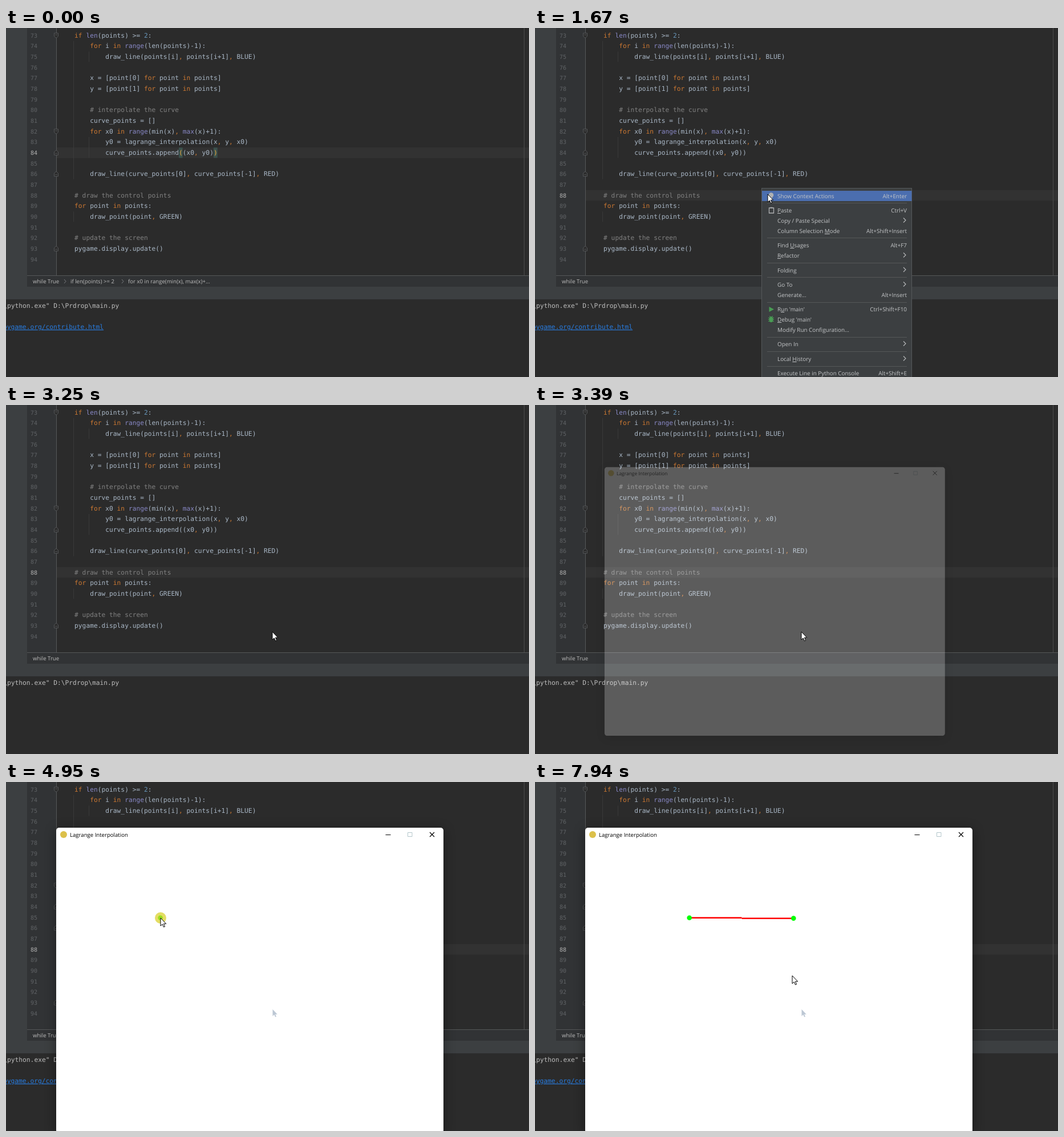
An HTML page that plays this animation: 917x611 px, repeating every 8 s.

```html
<!DOCTYPE html>
<html lang="en">
<head>
<meta charset="utf-8">
<title>Editor run</title>
<style>
html, body { margin: 0; width: 100%; height: 100%; overflow: hidden; background: #2b2b2b; }
svg { display: block; }
text { white-space: pre; text-rendering: geometricPrecision; text-decoration-skip-ink: none; font: 9.6px "Open Sans", "Noto Sans", sans-serif; }
.mono text { font: 11.25px "DejaVu Sans Mono", "Noto Sans Mono", monospace; }
.mono .num { font-size: 10px; }
#menu text { font-size: 9.9px; }
#win { filter: drop-shadow(0 4px 10px rgba(0, 0, 0, .4)); }
</style>
</head>
<body>
<svg id="stage" width="917" height="611" viewBox="0 0 917 611">
  <g id="base"></g>
  <g id="code" class="mono"></g>
  <g id="menu"></g>
  <g id="win"></g>
  <circle id="click" r="10" fill="#d9d028" opacity=".72"/>
  <path id="cursor" fill="#fff" stroke="#000" stroke-linejoin="round"/>
</svg>
<script>
const LOOP = 8000, CHAR = 6.773, ROW = 18.667;
const $ = id => document.getElementById(id);
const base = $('base'), code = $('code'), menu = $('menu'), win = $('win');
const ARROW = 'M0 0V14L3.2 11L5.5 16L7.6 15.1L5.4 10.2H9.7Z';

function add(parent, tag, attrs, text) {
  const el = document.createElementNS('http://www.w3.org/2000/svg', tag);
  for (const k in attrs) el.setAttribute(k, attrs[k]);
  if (text !== undefined) el.textContent = text;
  parent.append(el);
  return el;
}
const rect = (p, x, y, width, height, fill) => add(p, 'rect', { x, y, width, height, fill });
const line = (p, d, stroke, w = 1) => add(p, 'path', { d, stroke, fill: 'none', 'stroke-width': w });
const label = (p, x, y, s, fill, more) => add(p, 'text', { x, y, fill, ...more }, s);
const show = (el, on) => el.setAttribute('visibility', on ? 'visible' : 'hidden');
const rowY = n => 13 + (n - 73) * ROW;

// Editor frame
rect(base, 0, 0, 917, 611, '#2b2b2b');
rect(base, 37, 0, 51, 433, '#313335');
rect(base, 0, 0, 37, 453, '#3c3f41');
const caretRow = rect(base, 89, 0, 828, ROW, '#323232');
line(base, 'M88.5 0V433', '#555758');
line(base, 'M908.5 0V433', '#4b4b4b');
rect(base, 37, 433, 880, 20, '#313335');
line(base, 'M37 433.5H917', '#555758');
rect(base, 0, 453, 917, 22, '#3c3f41');
label(base, 47, 447, 'while True', '#bbbbbb');
const crumbs = add(base, 'g');
label(crumbs, 113, 447, 'if len(points) >= 2', '#bbbbbb');
label(crumbs, 214, 447, 'for x0 in range(min(x), max(x)+...', '#bbbbbb');
line(crumbs, 'M102 440l3 3.5l-3 3.5M203 440l3 3.5l-3 3.5', '#7a7d80');

// Source text, starting at line 73
const lines = `    if len(points) >= 2:
        for i in range(len(points)-1):
            draw_line(points[i], points[i+1], BLUE)

        x = [point[0] for point in points]
        y = [point[1] for point in points]

        # interpolate the curve
        curve_points = []
        for x0 in range(min(x), max(x)+1):
            y0 = lagrange_interpolation(x, y, x0)
            curve_points.append((x0, y0))

        draw_line(curve_points[0], curve_points[-1], RED)

    # draw the control points
    for point in points:
        draw_point(point, GREEN)

    # update the screen
    pygame.display.update()
`.split('\n');
const TOKEN = /(#.*)|\b(if|for|in)\b|\b(len|range|min|max)\b|\b(\d+)\b|(,)|[^\s#,\d]\w*|\S/g;
const COLORS = ['#808080', '#cc7832', '#8888c6', '#6897bb', '#cc7832'];
const numbers = lines.map((s, i) => {
  const y = rowY(73 + i) + 3.8;
  for (const m of s.matchAll(TOKEN)) {
    const kind = m.slice(1).findIndex(Boolean);
    label(code, 93 + m.index * CHAR, y, m[0], COLORS[kind] || '#a9b7c6');
  }
  return label(code, 43, y, 73 + i, '#606366', { class: 'num' });
});
for (const [col, from, to] of [[4, 74, 86], [8, 75, 75], [8, 83, 84], [4, 90, 90]])
  line(base, `M${Math.round(91.5 + col * CHAR) - .5} ${rowY(from) - 9}V${rowY(to) + 9}`, '#3a3a3a');
for (const [n, dir] of [[73, 1], [82, 1], [84, -1], [86, -1], [93, -1]])
  add(base, 'path', {
    d: 'M-3.5 -4H3.5V1.5L0 4.5L-3.5 1.5ZM-2 -1H2', fill: '#2b2b2b', stroke: '#585b5d', 'stroke-width': .9,
    transform: `translate(88 ${rowY(n)}) scale(1 ${dir})`
  });
const braces = add(code, 'g');
for (const [col, ch] of [[31, '('], [40, ')']]) {
  rect(braces, 93 + col * CHAR, rowY(84) - 9, CHAR, 18, '#3b514d');
  label(braces, 93 + col * CHAR, rowY(84) + 3.8, ch, '#f0a83c');
}

// Console
const command = label(code, -4.8, 489.5, '\\python.exe" D:\\Prdrop\\main.py', '#bbbbbb');
const link = label(code, -5, 527, 'pygame.org/contribute.html', '#287bde', { 'text-decoration': 'underline' });

// Context menu: centre y, text, shortcut ('>' opens a submenu), underlined letter
const items = [
  [294, 'Show Context Actions', 'Alt+Enter'],
  [319.5, 'Paste', 'Ctrl+V', 0],
  [337.5, 'Copy / Paste Special', '>'],
  [355.5, 'Column Selection Mode', 'Alt+Shift+Insert', 17],
  [380.5, 'Find Usages', 'Alt+F7', 5],
  [398.5, 'Refactor', '>', 0],
  [424, 'Folding', '>'],
  [449.5, 'Go To', '>'],
  [467.5, 'Generate...', 'Alt+Insert'],
  [492.5, "Run 'main'", 'Ctrl+Shift+F10', 1],
  [510.5, "Debug 'main'", '', 0],
  [528.5, 'Modify Run Configuration...', ''],
  [553.5, 'Open In', '>'],
  [579.5, 'Local History', '>', 6],
  [604.5, 'Execute Line in Python Console', 'Alt+Shift+E']
];
add(menu, 'rect', { x: 397.5, y: 280.5, width: 263, height: 340, fill: '#3c3f41', stroke: '#55585a' });
const hover = rect(menu, 398, 0, 262.5, 18, '#4b6eaf');
for (const y of [306, 367, 411, 436, 480, 541, 566, 592]) line(menu, `M407 ${y + .5}H652`, '#555758');
for (const [y, name, key, u] of items) {
  const t = label(menu, 425, y + 3.5, '', '#c3c5c7');
  [name.slice(0, u ?? 0), u === undefined ? '' : name[u], name.slice(u === undefined ? 0 : u + 1)]
    .forEach((s, i) => add(t, 'tspan', i === 1 ? { 'text-decoration': 'underline' } : {}, s));
  if (key === '>') line(menu, `M646 ${y - 5}l4 4l-4 4`, '#b8babc', 1.1);
  else label(menu, 652, y + 3.5, key, '#c3c5c7', { 'text-anchor': 'end' });
}
add(menu, 'circle', { cx: 414, cy: 292.5, r: 4.3, fill: '#afb1b3' });
rect(menu, 412, 296, 4, 4, '#afb1b3');
line(menu, 'M410.5 315H418.5V324H410.5ZM412.5 314.5H416.5', '#afb1b3', 1.3);
add(menu, 'path', { d: 'M410.5 488L419 492.5L410.5 497Z', fill: '#499c54' });
add(menu, 'ellipse', { cx: 414, cy: 510.5, rx: 3.5, ry: 4.8, fill: '#499c54' });
line(menu, 'M409 507.5H419M409 510.5H419M409 513.5H419M411 504.5L417 508.5M417 504.5L411 508.5', '#499c54', 1.2);

// Plot window
add(win, 'rect', { x: 88, y: 80, width: 679, height: 535, rx: 5, fill: '#fff' });
add(win, 'circle', { cx: 101, cy: 92, r: 6, fill: '#dcc04a' });
label(win, 112, 95.7, 'Lagrange Interpolation', '#000');
line(win, 'M665.5 92.5H674.5', '#000');
line(win, 'M704.5 88.5H712V95.5H704.5Z', '#b3c6cb');
line(win, 'M743 88L751 96M751 88L743 96', '#000', 1.1);
const ghost = add(win, 'path', { d: ARROW, fill: '#bcc7d4', transform: 'translate(467.5 398) scale(.85)' });
const segment = add(win, 'g');
line(segment, 'M271 237.8H362.5', '#f00', 2.6);
line(segment, 'M362.5 238.8H453', '#f00', 2.6);
const dots = [[270.7, 237.7], [453.3, 238.6]].map(([cx, cy]) => add(win, 'circle', { cx, cy, r: 4.3, fill: '#0f0' }));

// Pointer path: time, x, y
const path = [
  [230, 796, 592], [980, 405, 288], [1050, 400, 284], [1120, 397, 281], [1390, 397, 281],
  [1600, 408, 291], [1690, 408, 291], [2160, 458, 497], [2230, 458, 494], [2430, 458, 489.5],
  [2840, 458, 489.5], [3250, 467, 397], [3540, 467, 397], [3650, 431, 304], [3810, 431, 304],
  [3940, 415, 297], [4150, 415, 297], [4550, 271, 238], [5020, 271, 238], [5500, 453, 238],
  [6180, 453, 238], [6310, 455.5, 239], [6580, 455.5, 239], [7260, 383.5, 343], [7460, 383.5, 343],
  [7940, 451, 339]
];
const clicks = [[2630, 2700], [4950, 5020], [5910, 6040]];

function pointer(t) {
  const i = path.findIndex(k => k[0] > t);
  if (i < 0) return path[path.length - 1].slice(1);
  if (i === 0) return path[0].slice(1);
  const a = path[i - 1], b = path[i], u = (t - a[0]) / (b[0] - a[0]);
  const e = u * u * (3 - 2 * u);
  return [a[1] + (b[1] - a[1]) * e, a[2] + (b[2] - a[2]) * e];
}

$('cursor').setAttribute('d', ARROW);

function draw(t) {
  const [x, y] = pointer(t);
  const moved = t >= 1390, active = moved ? 88 : 84;
  caretRow.setAttribute('y', rowY(active) - 9.3);
  numbers.forEach((n, i) => n.setAttribute('fill', 73 + i === active ? '#b4b4b4' : '#606366'));
  show(braces, !moved);
  show(crumbs, !moved);

  menu.style.display = moved && t < 2700 ? '' : 'none';
  const item = items.find(k => Math.abs(k[0] - y) <= 9);
  show(hover, item);
  if (item) hover.setAttribute('y', item[0] - 9);

  show(command, t < 2910 || t >= 3050);
  show(link, t < 2910 || t >= 3510);

  const p = Math.min(1, Math.max(0, (t - 3320) / 260 * .96)), q = t >= 3650 ? 1 : p;
  const e = (1 - q) ** 2;
  win.style.display = q > 0 ? '' : 'none';
  win.style.opacity = q === 1 ? 1 : Math.min(.95, q ** 1.08);
  win.setAttribute('transform',
    `translate(${427.5 - 13 * e} ${347.5 - 6.6 * e}) scale(${1 - .22 * e}) translate(-427.5 -347.5)`);
  ghost.style.display = t >= 3650 ? '' : 'none';
  dots[0].style.display = t >= 4950 ? '' : 'none';
  dots[1].style.display = segment.style.display = t >= 5910 ? '' : 'none';

  const at = `translate(${x} ${y})`;
  $('click').setAttribute('transform', at);
  show($('click'), clicks.some(([a, b]) => t >= a && t < b));
  $('cursor').setAttribute('transform', at);
  show($('cursor'), t >= 230);
}

let start;
function tick(now) {
  start ??= now;
  draw((now - start) % LOOP);
  requestAnimationFrame(tick);
}
draw(0);
requestAnimationFrame(tick);
</script>
</body>
</html>
```
